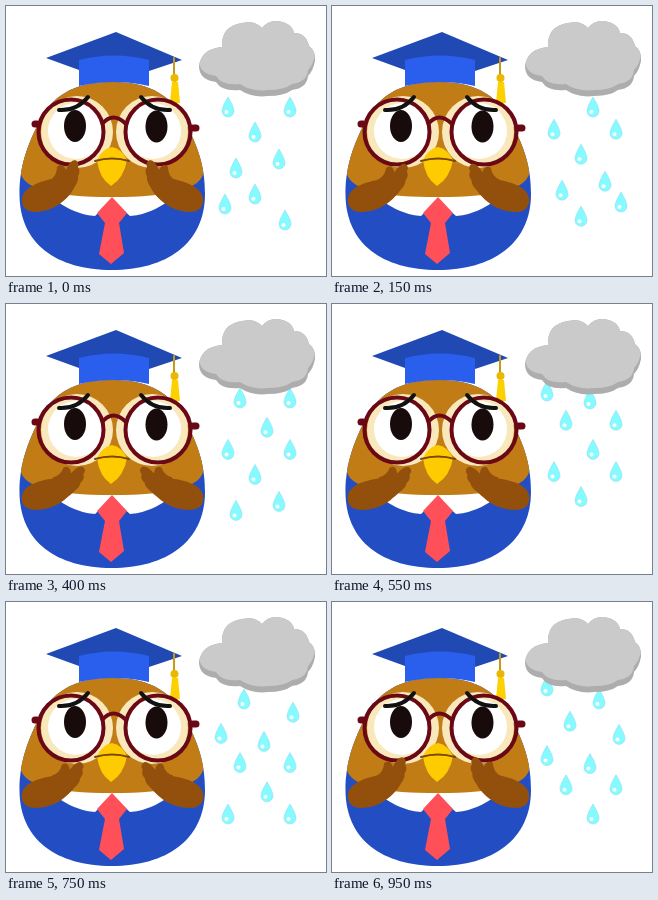
Animation of 320x270 px, one loop 1000 ms. Source, as an HTML page:

```html
<!DOCTYPE html>
<html lang="en">
<head>
<meta charset="utf-8">
<title>Sad owl in the rain</title>
<style>
html, body { margin: 0; width: 100%; height: 100%; overflow: hidden; background: #fff; }
svg { display: block; width: 100vw; height: 100vh; }
.drop { fill: #86fbff; stroke: #8fdcf4; stroke-width: .6; }
.line { fill: none; stroke-linecap: round; }
</style>
</head>
<body>
<svg viewBox="0 0 320 270">
  <defs>
    <path id="body" d="M106 76C146 76 167 91 180 118C195 146 199 166 199 188C199 238 160 264 106 264C51 264 13.500 238 13.500 188C13.500 166 18 146 32 118C45 91 66 76 106 76Z"/>
    <path id="cloud" d="M216 41Q215 20 236 17Q249 14 256 22Q262 14 272 15Q286 17 288 27Q300 27 303 40Q310 45 309 55Q307 65 302 70Q301 82 286 84Q278 90 262 90Q246 92 234 84Q216 86 210 76Q193 74 193 60Q195 43 216 41Z"/>
    <g id="drop">
      <path class="drop" d="M0 -10Q6 0 6 4A6 6 0 0 1 -6 4Q-6 0 0 -10Z"/>
      <circle cx="-1.5" cy="5" r="2" fill="#fff"/>
    </g>
    <g id="eye">
      <circle cx="71" cy="126" r="36" fill="#f8e8bb"/>
      <circle cx="70" cy="125" r="28" fill="#fff"/>
    </g>
    <g id="frame" class="line">
      <circle cx="65" cy="126" r="32.500" stroke="#6b0815" stroke-width="4"/>
      <path d="M53 104Q71 105 82 91" stroke="#111" stroke-width="4"/>
    </g>
    <path id="lid" class="line" stroke="#111" stroke-width="4" d="M56 124Q66 139 82 126"/>
    <g id="wing">
      <path class="arm" d="M16 194C16 182 32 176 46 173L70 178C62 196 45 206 28 206Q16 205 16 194Z"/>
      <path class="hand" d="M44 174Q51 170 51 161Q56 156 60 164Q64 154 69 154Q74 156 72 161Q75 165 72 170Q73 174 69 180Q63 193 52 196Z"/>
    </g>
    <clipPath id="bodyClip"><use href="#body"/></clipPath>
    <clipPath id="cloudClip"><use href="#cloud"/></clipPath>
  </defs>

  <g id="rain"></g>
  <use href="#cloud" fill="#adadad"/>
  <g clip-path="url(#cloudClip)"><use href="#cloud" y="-6" fill="#cacaca"/></g>

  <!-- body and face -->
  <use href="#body" fill="#234ec3"/>
  <g clip-path="url(#bodyClip)">
    <path fill="#fff" d="M38 184Q62 208 89 210L106 194L124 210Q151 208 175 184Z"/>
    <path fill="#c17c16" d="M0 60H213V164H198C196 184 165 191 106 191C48 191 16 184 14 164H0Z"/>
  </g>
  <path fill="#ff5059" d="M106 191L121 207L113 217L118 247L105 258L93 248L99 217L91 207Z"/>

  <!-- cap -->
  <path fill="#2049b4" d="M40 52L110 26L176 54L143 65L73 64Z"/>
  <path fill="#2a5eec" d="M73 54Q108 45 143 54V80Q108 72 73 80Z"/>
  <path class="line" stroke="#c79a12" stroke-width="2" d="M168 52V70"/>
  <path fill="#fdd000" d="M166 76H172L174 97H164Z"/>
  <circle cx="168.500" cy="72" r="4" fill="#e9b800"/>

  <!-- eyes and glasses -->
  <use href="#eye"/>
  <use href="#eye" transform="matrix(-1 0 0 1 217 0)"/>
  <g id="open" fill="#170b0c">
    <ellipse cx="69" cy="120" rx="11" ry="16"/><ellipse cx="150.500" cy="120.500" rx="11" ry="16"/>
  </g>
  <g id="shut">
    <use href="#lid"/>
    <use href="#lid" transform="matrix(-1 0 0 1 217 0)"/>
  </g>
  <use href="#frame"/>
  <use href="#frame" transform="matrix(-1 0 0 1 217 0)"/>
  <g class="line" stroke="#6b0815" stroke-width="4">
    <path d="M97 117Q107 106 119 117"/>
    <path stroke-width="7" d="M29 118H31M187 122H190"/>
  </g>

  <!-- beak -->
  <path fill="#fdcb00" d="M106 141Q116 143 121 154Q118 172 105 180Q93 172 91 154Q96 143 106 141Z"/>
  <path class="line" stroke="#7a4708" stroke-width="2" d="M89 155Q106 150 123 155"/>

  <g id="wings" fill="#93500c"></g>
</svg>
<script>
const LOOP = 1000, STEP = 50;
const TICK = 150, FALL = 22.2, BOTTOM = 217;

// drops [x, y] that join the rain at each tick
const births = [
  [[222, 101], [284, 101], [249, 126], [273, 153], [230, 162], [249, 188], [219, 198], [279, 214]],
  [[261, 101], [289, 196]],
  [[234, 94], [284, 94]],
  [[258, 95], [215, 87]],
  [[287, 88]],
  [[238, 97]],
  [[267, 97], [215, 84]]
];

const byId = id => document.getElementById(id);
const rain = byId('rain');

function show(el, on) {
  el.setAttribute('visibility', on ? 'visible' : 'hidden');
}

const drops = births.flatMap((list, born) => list.map(([x, y]) => {
  const el = document.createElementNS('http://www.w3.org/2000/svg', 'use');
  el.setAttribute('href', '#drop');
  rain.append(el);
  return {el, x, y, born};
}));

// two mirrored wings, each with its own arm and hand
const wings = byId('wings');
for (const flip of ['', 'matrix(-1 0 0 1 213 0)']) {
  const wing = byId('wing').cloneNode(true);
  wing.removeAttribute('id');
  if (flip) wing.setAttribute('transform', flip);
  wings.append(wing);
}

function turn(part, spin) {
  for (const el of wings.querySelectorAll(part)) el.setAttribute('transform', spin);
}

function draw(now) {
  const t = Math.floor(now % LOOP / STEP) * STEP;
  const tick = Math.floor(t / TICK);
  for (const d of drops) {
    const y = d.y + FALL * (tick - d.born);
    d.el.setAttribute('transform', `translate(${d.x} ${y})`);
    show(d.el, tick >= d.born && y < BOTTOM);
  }

  const bend = Math.sin(Math.PI * t / LOOP);
  const arm = `rotate(${5 * bend} 30 190)`;
  turn('.arm', arm);
  turn('.hand', `${arm} rotate(${15 * bend} 52 178)`);

  const blink = t >= 800 && t < 950;
  show(byId('open'), !blink);
  show(byId('shut'), blink);
}

function frame(now) {
  draw(now);
  requestAnimationFrame(frame);
}
draw(0);
requestAnimationFrame(frame);
</script>
</body>
</html>
```
